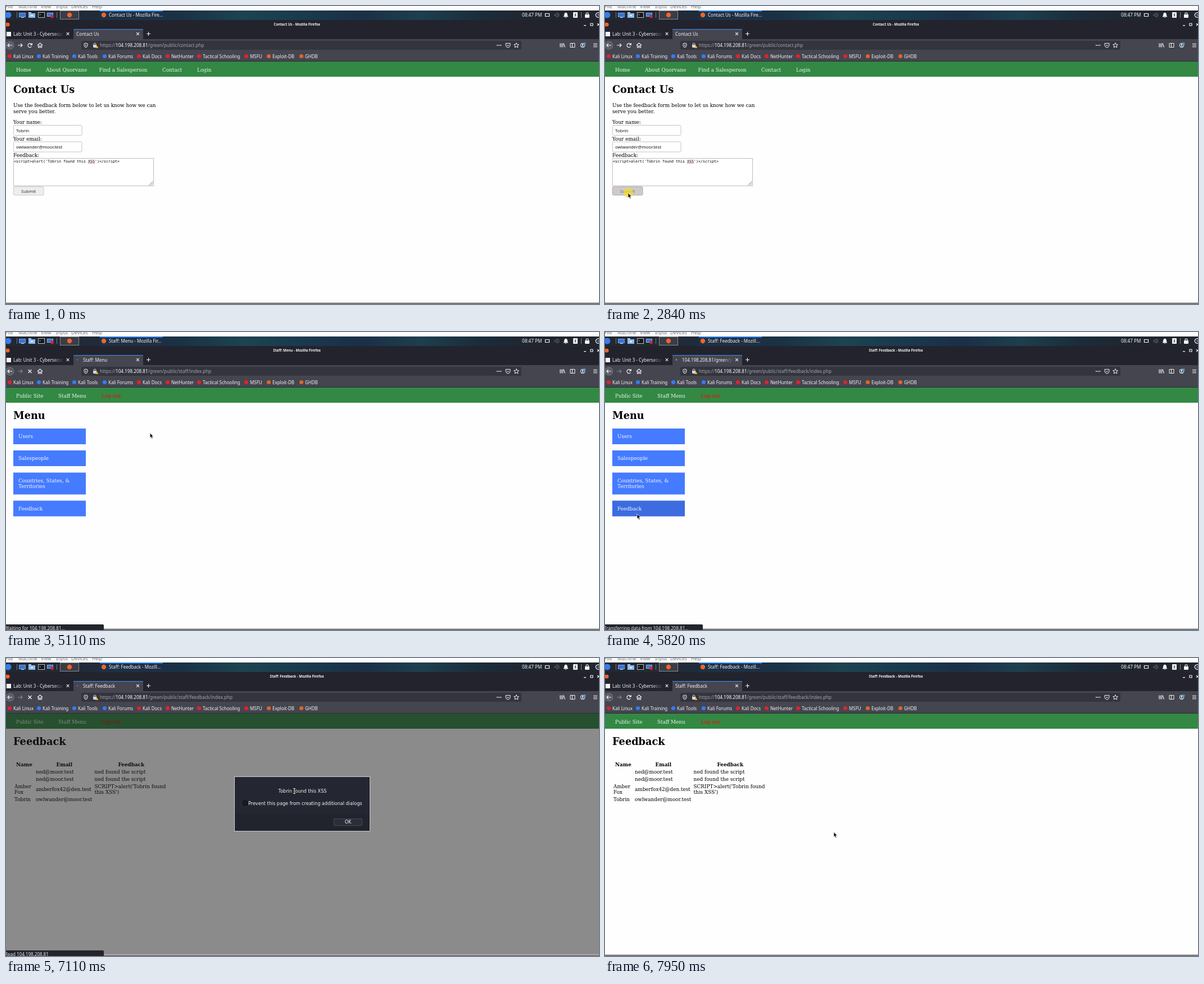
An HTML page with a canvas that plays this animation: 1055 px wide and 531 px high, repeating every 8000 ms.

```html
<!DOCTYPE html>
<html lang="en">
<head>
<meta charset="utf-8">
<title>Feedback form</title>
<style>
html, body { margin: 0; width: 100%; height: 100%; overflow: hidden; background: #fefefe; }
canvas { display: block; }
</style>
</head>
<body>
<canvas id="stage" width="1055" height="531"></canvas>
<script>
const g = document.getElementById('stage').getContext('2d', { alpha: false });
const LOOP = 8000;
const UI = '"Noto Sans", sans-serif', SERIF = '"DejaVu Serif", serif';
const SANS = '"DejaVu Sans", sans-serif', MONO = '"DejaVu Sans Mono", monospace';
const BAR = '#22232c', TOOL = '#44454f', LIGHT = '#f4f4f6', GREY = '#a5a5ad', RED = '#d8262c', BLUE = '#367bf0', ORANGE = '#f2632a';
const HOST = '104.198.208.81', NAME = 'Tobrin';

// pages: [start, title, address path]
const pages = [
  [0, 'Contact Us', 'contact.php'],
  [3400, 'Feedback Received', 'feedback_received.php'],
  [5000, 'Staff: Menu', 'staff/index.php'],
  [5680, 'Staff: Feedback', 'staff/feedback/index.php']
];
// pointer: [time, x, y]; equal times make a jump
const path = [
  [70, 150, 531], [830, 57, 350], [900, 57, 350], [1130, 45, 338], [1530, 45, 338],
  [1530, 45, 337], [2460, 45, 337], [2560, 28, 328], [2690, 41, 333], [3850, 41, 333],
  [4500, 347, 114], [4850, 347, 114], [5550, 57, 324], [5890, 57, 324],
  [5890, 602, 292], [6500, 602, 292], [7000, 513, 237], [7190, 513, 237],
  [7190, 599, 300], [7560, 500, 319], [7900, 407, 310]
];
const within = (t, a, b) => t >= a && t < b;

function box(x, y, w, h, color, edge) {
  g.fillStyle = color;
  g.fillRect(x, y, w, h);
  if (edge) {
    g.strokeStyle = edge;
    g.lineWidth = 1;
    g.strokeRect(x + .5, y + .5, w - 1, h - 1);
  }
}
function round(x, y, w, h, r, color, edge) {
  g.beginPath();
  g.roundRect(x, y, w, h, r);
  g.fillStyle = color;
  g.fill();
  if (edge) { g.strokeStyle = edge; g.lineWidth = 1; g.stroke(); }
}
function dot(x, y, r, color) {
  g.beginPath();
  g.arc(x, y, r, 0, 7);
  g.fillStyle = color;
  g.fill();
}
function line(d, x, y, color = LIGHT, width = 1.1, fill) {
  const p = new Path2D(d);
  g.save();
  g.translate(x, y);
  if (fill) { g.fillStyle = fill; g.fill(p); }
  g.strokeStyle = color;
  g.lineWidth = width;
  g.stroke(p);
  g.restore();
}
function text(s, x, y, size, color, family = UI, weight = '', align = 'left') {
  g.font = `${weight} ${size}px ${family}`;
  g.textAlign = align;
  g.fillStyle = color;
  g.fillText(s, x, y);
  return x + g.measureText(s).width;
}
const serif = (s, x, y, color = '#000', weight) => text(s, x, y, 8.87, color, SERIF, weight);
const heading = s => text(s, 13, 155, 17.74, '#000', SERIF, 'bold');
const cross = (x, y, r = 2.3, w) => line(`M${-r} ${-r}L${r} ${r}M${r} ${-r}L${-r} ${r}`, x, y, LIGHT, w);
function fade(x, y, w, h, color) {
  const f = g.createLinearGradient(x, 0, x + w, 0);
  f.addColorStop(0, color + '00');
  f.addColorStop(1, color);
  box(x, y, w, h, f);
}

function desktopPanel(title) {
  box(0, 0, 1055, 8, '#fdfdfd');
  [['File', -1], ['Machine', 22], ['View', 62], ['Input', 89], ['Devices', 116], ['Help', 153]]
    .forEach(([s, x]) => text(s, x, 4, 8.4, '#777'));
  const p = g.createLinearGradient(0, 0, 1055, 0);
  ['#232831', '#242a35', '#1b2c41', '#1a3246', '#1d4350', '#1a3a4e', '#1b2f47', '#1d3f4e', '#1b2c3a', '#20252e', '#22262e']
    .forEach((c, i) => p.addColorStop(i / 10, c));
  box(0, 8, 1055, 17, p);
  dot(4, 16, 5.5, BLUE);
  box(19, 11, 1, 10, '#777');
  box(90, 11, 1, 10, '#777');
  box(23, 12, 12, 8, '#3d74cf', '#6aa0ee');
  box(27, 20, 5, 1, '#cdd3dd');
  box(40, 11, 5, 2, '#9cc7f5');
  box(40, 13, 12, 8, '#8fbef2');
  box(44, 16, 4, 2, '#eef5fc');
  box(57, 11, 12, 10, '#15171c', '#b9bdc4');
  text('>', 59, 17, 5, LIGHT, MONO);
  box(73, 12, 11, 7, '#3d74cf', '#8fb4ea');
  dot(82, 18.5, 2.8, RED);
  box(96, 8, 34, 16, '#3a3d46', '#868a93');
  dot(113, 16, 4.2, ORANGE);
  box(167, 8, 112, 17, '#1d3045');
  box(167, 8, 112, 2, '#2b7de0');
  dot(174, 16, 4.2, ORANGE);
  text(title, 183, 19, 8, LIGHT);

  text('08:47 PM', 918, 19, 8.2, LIGHT);
  line('M0 0H7V5H0Z', 959.5, 13.5, LIGHT, 1.2);
  line('M0 2H2L5 -1V7L2 4H0ZM7 0Q9 3 7 6', 976, 13, '#656a73', 1);
  line('M0 7Q1.5 6 1.5 3Q2 0 4 0Q6 0 6.5 3Q6.5 6 8 7ZM3 8.5H5', 992, 12, LIGHT, .8, LIGHT);
  round(1009, 11, 8, 10, 1, LIGHT);
  line('M1 -3L-1 0H1L-1 3', 1013, 16, BAR, 1);
  box(1023, 11, 1, 10, '#888');
  round(1030, 15, 8, 6, 1, LIGHT);
  line('M0 3V1Q0 -1 2 -1Q4 -1 4 1V3', 1032, 13, LIGHT, 1.2);
  line('M5 -3A4 4 0 1 0 5 3M1 0H6', 1051, 16, LIGHT, 1.2);
}

function browser(t, title, address, busy) {
  box(0, 25, 1055, 34, BAR);
  dot(3, 33, 3.6, ORANGE);
  text(title + ' - Mozilla Firefox', 517.5, 35, 6.1, LIGHT, UI, 'bold', 'center');
  box(1028, 34, 4, 1.3, LIGHT);
  line('M0 0H4V4H0Z', 1040, 31, LIGHT, 1.2);
  cross(1054, 33, 2, 1.2);

  box(1, 46, 8, 8, '#f5f5f5');
  text('Lab: Unit 3 - Cybersecuri', 13, 52.5, 8, LIGHT);
  fade(84, 42, 19, 16, BAR);
  box(103, 42, 16, 16, BAR);
  cross(110, 49.5);
  box(120, 41, 124, 18, TOOL);
  box(120, 41, 124, 1.2, '#3f83dc');
  const waiting = t >= 5680 && t < 5890;
  const label = waiting ? `${HOST}/green/pu` : title;
  text(label, busy ? 137 : 125, 52.5, 8, LIGHT);
  if (busy) dot(127, 49.5, 1.1, waiting ? '#c5c5ca' : '#4591e8');
  fade(210, 43, 18, 15, TOOL);
  box(228, 43, 16, 15, TOOL);
  cross(234.5, 49.5);
  line('M-3.5 0H3.5M0 -3.5V3.5', 253.5, 49.5);

  box(0, 59, 1055, 40, TOOL);
  dot(7, 70, 7.4, '#777881');
  dot(7, 70, 6.6, '#5b5c66');
  line('M4 0H-4M-1 -3L-4 0L-1 3', 7, 70, LIGHT, 1.2);
  line('M-4 0H4M1 -3L4 0L1 3', 25, 70, t < 3400 ? LIGHT : '#85868e', 1.2);
  if (busy && !waiting) cross(42.5, 70, 3, 1.3);
  else line('M3.3 -1A3.5 3.5 0 1 0 3 2M3.8 -4V-.8H.6', 42.5, 70, LIGHT, 1.2);
  line('M-4.5 0L0 -4L4.5 0M-3 -1V4H-1V1H1V4H3V-1', 60.5, 70, LIGHT, 1.1);
  round(134, 62, 783, 16, 2, '#33343e');
  line('M-3 -3L0 -4L3 -3V0Q3 3 0 4Q-3 3 -3 0ZM0 -2V2', 142, 70, LIGHT, 1);
  round(155, 69, 6, 5, 1, '#d8d8dc');
  line('M0 3V1Q0 -1 2 -1Q4 -1 4 1V3', 156, 67, '#d8d8dc', 1);
  line('M0 4L2.5 0L5 4Z', 159, 70.5, '#f1b62c', .7, '#f1b62c');
  let x = text('https://', 167, 73, 8.15, GREY);
  x = text(HOST, x, 73, 8.15, '#fff');
  text('/green/public/' + address, x, 73, 8.15, GREY);
  for (let i = 0; i < 3; i++) dot(874 + i * 3.2, 70, 1, LIGHT);
  line('M-4 -3.5H4V0Q3 4 0 4Q-3 4 -4 0ZM-2 -1L0 1L2 -1', 893, 70, LIGHT, 1);
  line('M0 -4.4L1.3 -1.4L4.4 -1.2L2 .9L2.8 4L0 2.3L-2.8 4L-2 .9L-4.4 -1.2L-1.3 -1.4Z', 908, 70, LIGHT, 1);
  line('M0 0V7M2.3 0V7M4.6 0V7M6 0L8.5 7', 986, 66.5, LIGHT, 1.1);
  line('M0 0H8V7H0ZM3.5 0V7', 1004, 66.5, LIGHT, 1);
  line('M-3.8 0A3.8 3.8 0 1 0 3.8 0A3.8 3.8 0 1 0 -3.8 0M-2 2.6Q0 0 2 2.6', 1026, 70, LIGHT, 1);
  dot(1026, 69, 1.4, LIGHT);
  dot(1029.5, 67, 2, '#3aa0f3');
  line('M0 0H7M0 2.7H7M0 5.4H7', 1045, 67.3, LIGHT, 1.1);

  [['Kali Linux', 13, RED], ['Kali Training', 65, BLUE], ['Kali Tools', 128, BLUE], ['Kali Forums', 182, BLUE],
   ['Kali Docs', 243, RED], ['NetHunter', 294, RED], ['Tactical Schooling', 350, RED], ['MSFU', 434, RED],
   ['Exploit-DB', 474, '#d9652b'], ['GHDB', 532, '#d9652b']].forEach(([s, x, color]) => {
    dot(x - 6.5, 89.5, 3.6, color);
    text(s, x, 93, 8, LIGHT);
  });
  box(0, 98, 1055, 1, '#2a2b33');
}

function navBar(staff) {
  box(0, 99, 1055, 432, '#fefefe');
  box(0, 99, 1055, 27, '#338844');
  const items = staff ? [['Public Site', 18], ['Staff Menu', 93], ['Log out', 170]]
    : [['Home', 18], ['About Quorvane', 71], ['Find a Salesperson', 165.5], ['Contact', 278], ['Login', 340]];
  items.forEach(([s, x]) => serif(s, x, 116.5, s === 'Log out' ? '#f00' : '#eef5ef'));
}

function contactPage(t) {
  const pressed = within(t, 2840, 3000);
  heading('Contact Us');
  serif('Use the feedback form below to let us know how we can', 13, 180);
  serif('serve you better.', 13, 190.5);
  [['Your name:', 210, NAME], ['Your email:', 239.5, 'owlwander@moor.test']].forEach(([s, y, value]) => {
    serif(s, 13, y);
    round(13.5, y + 2.5, 121.5, 18, 2, '#fff', '#c4c4c4');
    text(value, 18, y + 14.5, 7.8, '#111');
  });
  serif('Feedback:', 13, 269);
  box(13, 271, 250, 50, '#fff', '#bdbdbd');
  text(`<script>alert('${NAME} found this XSS')<\/script>`, 14, 279, 6.65, '#000', MONO);
  line('M0 0L1.5 1.5L3 0L4.5 1.5L6 0L7.5 1.5L9 0L10.5 1.5L12 0', 146, 279.3, '#e22', .8);
  if (within(t, 600, 1850)) box(198, 272, 1, 9, '#000');
  line('M0 7L7 0M3.5 7L7 3.5', 254.5, 312.5, '#777', 1);
  round(13.5, 322, 53.5, 15, 2, pressed ? '#cecaca' : '#eeedec', pressed ? '#aaa6a6' : '#cbc8c5');
  text('Submit', 40, 332.5, 7.8, pressed ? '#6d6a6a' : '#333', UI, '', 'center');
}

function receivedPage() {
  heading('Feedback Received');
  serif('Thank you for submitting feedback. We hope to be able to', 13, 180);
  serif('use it to serve you better.', 13, 190.5);
}

function menuPage(t) {
  heading('Menu');
  [[172, 28, 'Users'], [211, 28, 'Salespeople'], [250.5, 39, 'Countries, States, &', 'Territories'], [300.5, 28, 'Feedback']]
    .forEach(([y, h, ...rows]) => {
      box(13, y, 129, h, y > 300 && t > 5480 ? '#3c6ce0' : '#457bff');
      rows.forEach((s, i) => serif(s, 22, y + 17.3 + i * 10.4, '#f4f7ff'));
    });
}

function feedbackPage(full) {
  heading('Feedback');
  const [a, b, c] = full ? [18, 89.5, 199.5] : [20, 93.5, 201];
  serif('Name', a, 193, '#000', 'bold');
  serif('Email', b, 193, '#000', 'bold');
  serif('Feedback', c, 193, '#000', 'bold');
  const [mail, note] = full ? [53, 157.5] : [57, 161];
  for (let i = 0; i < (full ? 2 : 1); i++) {
    serif('ned@moor.test', mail, 206 + i * 12.7);
    serif('ned found the script', note, 206 + i * 12.7);
  }
  if (!full) return;
  serif('Amber', 15, 231.5);
  serif('Fox', 15, 242);
  serif('amberfox42@den.test', 53, 236.5);
  serif(`SCRIPT>alert('${NAME} found`, 157.5, 231.5);
  serif("this XSS')", 157.5, 242);
  serif(NAME, 15, 254.5);
  serif('owlwander@moor.test', 53, 254.5);
}

function dialog() {
  box(0, 99, 1055, 432, 'rgba(26,26,26,.5)');
  box(406, 211, 242, 98, '#242731', '#c9cacd');
  box(407, 277, 240, 31, '#22242d');
  text(`${NAME} found this XSS`, 527.5, 240, 8.1, LIGHT, SANS, '', 'center');
  round(421.5, 254.5, 8, 8, 1, '#181a21', '#0f1116');
  text('Prevent this page from creating additional dialogs', 431, 262, 8.1, LIGHT, SANS);
  round(583.5, 286.5, 50, 12, 1.5, '#2b2e39', '#484b56');
  text('OK', 608.5, 295, 8.1, LIGHT, SANS, '', 'center');
}

function pointer(t) {
  if (t < path[0][0]) return;
  const i = path.findIndex(k => k[0] > t);
  const b = i < 0 ? path[path.length - 1] : path[i], a = i < 0 ? b : path[i - 1];
  let u = b[0] > a[0] ? (t - a[0]) / (b[0] - a[0]) : 1;
  u = u * u * (3 - 2 * u);
  const x = a[1] + (b[1] - a[1]) * u, y = a[2] + (b[2] - a[2]) * u;
  if (within(t, 2840, 3000) || within(t, 4700, 4850) || within(t, 5570, 5700))
    dot(x + .5, y, 8.5, 'rgba(245,225,30,.7)');
  if (within(t, 4450, 4900))
    line('M0 1Q1 -.5 2 1V4L6 5V8L5 10H1L-1 6L0 5Z', x, y, '#dfe8df', .6, '#0b0f0b');
  else if (within(t, 6900, 7190)) {
    const beam = 'M-2 -4.5H2M0 -4.5V4.5M-2 4.5H2';
    line(beam, x, y, '#111', 2.4);
    line(beam, x, y, '#fff', 1.1);
  } else
    line('M0 0V9L2 7.2L3.4 10.5L5 9.8L3.6 6.6H6.2Z', x, y, '#f2f2f2', .8, '#0a0a0a');
}

function draw(t) {
  const [, title, address] = pages.filter(p => p[0] <= t).pop();
  const busy = within(t, 2900, 3550) || within(t, 4750, 5250) || within(t, 5680, 7300);
  const full = title + ' - Mozilla Firefox';
  const cut = { 'Contact Us': 25, 'Feedback Received': 22, 'Staff: Menu': 25, 'Staff: Feedback': 24 }[title];
  desktopPanel(full.slice(0, cut) + '...');
  browser(t, title, address, busy);
  navBar(t >= 5000);
  if (t < 3400) contactPage(t);
  else if (t < 5000) receivedPage();
  else if (t < 5890) menuPage(t);
  else feedbackPage(t >= 6500);
  if (within(t, 5890, 7190)) dialog();
  box(0, 528, 1055, 1, '#c8c8c8');
  box(0, 529, 1055, 2, '#77787c');
  if (busy && t < 7190) {
    round(-3, 521, 177, 13, 2, '#24252b');
    const status = t >= 5890 ? 'Read ' : t >= 5680 ? 'Transferring data from ' : 'Waiting for ';
    text(status + HOST + (t >= 5890 ? '' : '…'), -2, 530.5, 8, '#e4e4e8');
  }
  pointer(t);
}

function tick() {
  draw(performance.now() % LOOP);
  requestAnimationFrame(tick);
}
tick();
</script>
</body>
</html>
```
